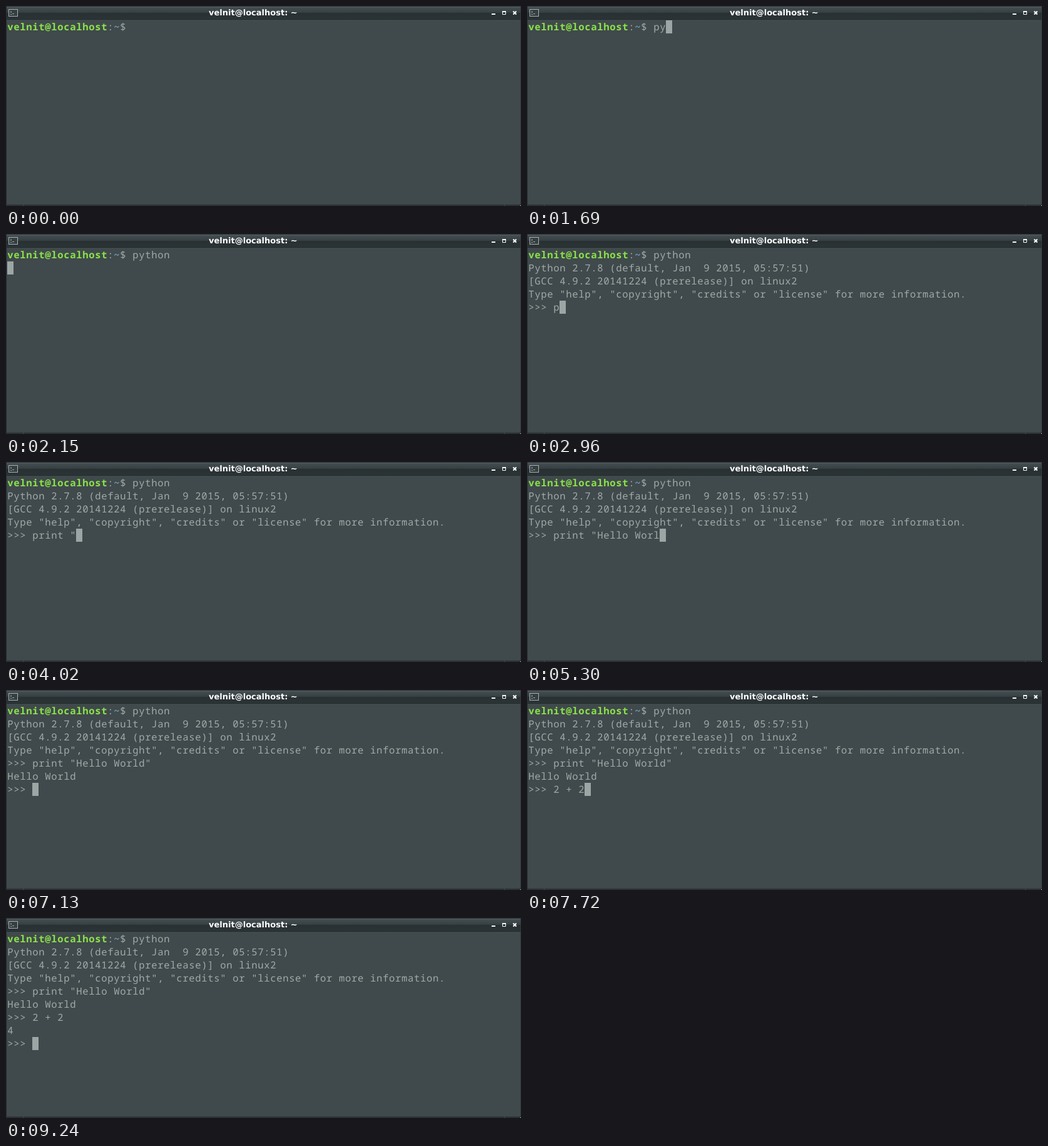
An HTML page that plays this animation: 823x321 px, repeating every 9.81 s.

```html
<!DOCTYPE html>
<html lang="en">
<head>
<meta charset="utf-8">
<title>Terminal</title>
<style>
  html, body { margin: 0; width: 100%; height: 100%; overflow: hidden; background: #40494b; }
  svg { display: block; width: 823px; height: 321px; }
  text { white-space: pre; text-rendering: geometricPrecision; }
  /* Letters sit on a 10px grid. */
  #screen { font: 15.6px "Noto Sans Mono", "DejaVu Sans Mono", monospace; letter-spacing: calc(10px - .6em); fill: #a0aaa8; }
  #caption { font: bold 13px "DejaVu Sans", sans-serif; fill: #fff; }
  .user { font-weight: bold; fill: #8ae24a; }
  .path { font-weight: bold; fill: #729fbf; }
</style>
</head>
<body>
<svg viewBox="0 0 823 321">
  <defs>
    <linearGradient id="bar" x2="0" y2="1">
      <stop offset="0" stop-color="#485256"/>
      <stop offset=".5" stop-color="#353e41"/>
      <stop offset=".5" stop-color="#283032"/>
      <stop offset="1" stop-color="#2b3436"/>
    </linearGradient>
  </defs>
  <rect width="823" height="321" fill="#40494b"/>
  <rect width="823" height="22" fill="url(#bar)"/>
  <path d="M0 .5H823M.5 0V321" stroke="#252d2f" fill="none"/>
  <path d="M822.5 0V321" stroke="#313a3c"/>
  <path d="M1 1.5H822" stroke="#566165"/>
  <path d="M1 21.5H822" stroke="#23292b"/>
  <path d="M1 318.5H822" stroke="#394244"/>
  <path d="M0 320H823" stroke="#293133" stroke-width="2"/>
  <path d="M27.5 319V321M796.5 319V321" stroke="#465154"/>
  <rect x="822" y="320" width="1" height="1" fill="#e8ebeb"/>

  <rect x="4.5" y="5.5" width="14" height="11" fill="#353e40" stroke="#aab1b2"/>
  <path d="M7 8l2 1.5l-2 1.5M10 12.5h3M7 13.5h2" fill="none" stroke="#a3acad"/>
  <text id="caption" x="324" y="15">velnit@localhost: ~</text>
  <g fill="none" stroke="#fff">
    <path d="M776 13H782" stroke-width="2"/>
    <path d="M793.5 8V13.5H798.5V8"/>
    <path d="M793 9H799" stroke-width="2"/>
    <path d="M810.5 8.5L815.5 13.5M815.5 8.5L810.5 13.5" stroke-width="2"/>
  </g>

  <g id="screen"></g>
  <rect id="cursor" width="10" height="21" fill="#9ba6a5"/>
</svg>
<script>
const LOOP = 9810, CELL = 10, LINE = 21, LEFT = 2, TOP = 23;
const BASE = 16, BEARING = 0.3;
const NS = "http://www.w3.org/2000/svg";
const screen = document.getElementById("screen");
const cursor = document.getElementById("cursor");

// Each line: row, time it appears, spans of [text, class].
const prompt = [[">>> "]];
const lines = [
  [0, 0, [["velnit@localhost", "user"], [":"], ["~", "path"], ["$ "]]],
  [1, 2220, [["Python 2.7.8 (default, Jan  9 2015, 05:57:51)"]]],
  [2, 2220, [["[GCC 4.9.2 20141224 (prerelease)] on linux2"]]],
  [3, 2220, [['Type "help", "copyright", "credits" or "license" for more information.']]],
  [4, 2220, prompt],
  [5, 5990, [["Hello World"]]],
  [6, 5990, prompt],
  [7, 8080, [["4"]]],
  [8, 8080, prompt]
];

// Each input: row, first column, text, time of every key.
const inputs = [
  [0, 20, "python", [1610, 1690, 1770, 1840, 1910, 1980]],
  [4, 4, 'print "Hello World"', [2960, 3180, 3280, 3370, 3460, 3690, 4020, 4230,
    4390, 4500, 4640, 4800, 4860, 5000, 5100, 5200, 5300, 5430, 5600]],
  [6, 4, "2 + 2", [7170, 7270, 7480, 7600, 7720]]
];

// Cursor states: time, row, column; a time alone hides it.
const moves = [
  [0], [540, 0, 20], [1140], [1520, 0, 20],
  [2150, 1, 0], [2220, 4, 4], [2710], [2920, 4, 4],
  [5990, 6, 4], [6560], [7130, 6, 4],
  [8080, 8, 4], [8650], [9240, 8, 4]
];
for (const [row, col, , keys] of inputs)
  keys.forEach((time, i) => moves.push([time, row, col + i + 1]));
moves.sort((a, b) => a[0] - b[0]);

function addText(row, col) {
  const node = document.createElementNS(NS, "text");
  node.setAttribute("x", LEFT + BEARING + col * CELL);
  node.setAttribute("y", TOP + row * LINE + BASE);
  return screen.appendChild(node);
}

const lineNodes = lines.map(([row, , spans]) => {
  const group = screen.appendChild(document.createElementNS(NS, "g"));
  let col = 0;
  for (const [str, cls] of spans) {
    const node = addText(row, col);
    node.textContent = str;
    if (cls) node.setAttribute("class", cls);
    group.appendChild(node);
    col += str.length;
  }
  return group;
});
const inputNodes = inputs.map(([row, col]) => addText(row, col));

function show(node, on) {
  node.setAttribute("visibility", on ? "visible" : "hidden");
}

function draw(t) {
  lines.forEach(([, start], i) => show(lineNodes[i], t >= start));
  inputs.forEach(([, , str, keys], i) => {
    inputNodes[i].textContent = str.slice(0, keys.filter(k => k <= t).length);
  });
  const [, row, col] = moves.filter(m => m[0] <= t).pop();
  show(cursor, row !== undefined);
  if (row !== undefined) {
    cursor.setAttribute("x", LEFT + col * CELL);
    cursor.setAttribute("y", TOP + row * LINE);
  }
}

const begin = performance.now();
function tick() {
  draw((performance.now() - begin) % LOOP);
  requestAnimationFrame(tick);
}
tick();
</script>
</body>
</html>
```
